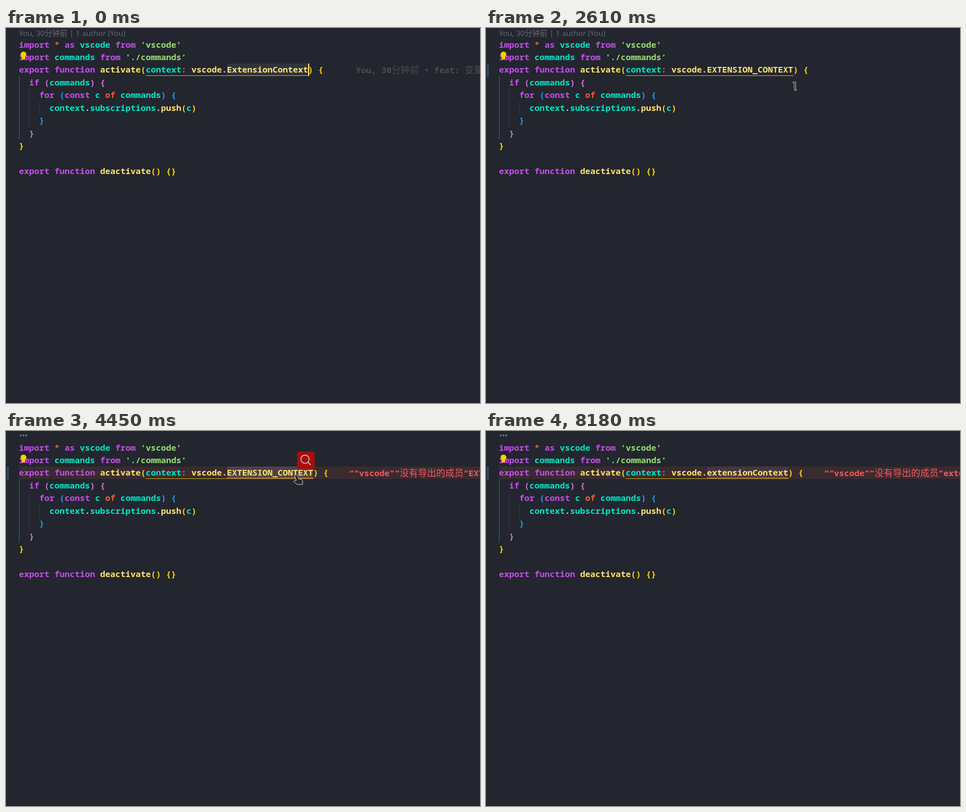
An HTML page with a canvas for the animation above (8260 ms loop, 841 px wide and 665 px high).

```html
<!DOCTYPE html>
<html lang="zh">
<head>
<meta charset="utf-8">
<title>Rename variable</title>
<style>
html, body { margin: 0; height: 100%; overflow: hidden; background: #23262e; }
canvas { display: block; }
</style>
</head>
<body>
<canvas id="stage" width="841" height="665"></canvas>
<script>
const ctx = document.getElementById('stage').getContext('2d');
const LOOP = 8260;
const MONO = 'bold 15px "Noto Sans Mono", "DejaVu Sans Mono", monospace';
const CJK = '"Noto Sans CJK SC", "Noto Sans CJK", sans-serif';
const sans = (size, style = '') => `${style} ${size}px "Open Sans", "Noto Sans", sans-serif`;

const COLORS = {
  k: '#c74ded', v: '#00e8c6', s: '#96e072', f: '#ffe66d', o: '#ee5d43',
  p: '#d5ced9', g: '#ffd700', m: '#da70d6', b: '#179fff', c: '#6f7178'
};

// "~x" switches to the colour x
const codeLines = word => [
  "~kimport ~o* ~kas ~vvscode ~kfrom ~s'vscode'",
  "~kimport ~vcommands ~kfrom ~s'./commands'",
  `~kexport function ~factivate~g(~vcontext~o: ~fvscode~p.~f${word}~g) {`,
  '~k  if ~m(~vcommands~m) {',
  '~k    for ~b(~kconst ~vc ~oof ~vcommands~b) {',
  '~v      context~p.~vsubscriptions~p.~fpush~g(~vc~g)',
  '~b    }',
  '~m  }',
  '~g}',
  '',
  '~kexport function ~fdeactivate~g() {}'
];

// label, shortcut ('>' is a submenu); null is a separator
const MENU = [
  ['常量转驼峰', 'Ctrl+L Ctrl+L'], ['改为驼峰命名', 'Ctrl+N Ctrl+N'],
  ['驼峰转常量', 'Ctrl+U Ctrl+U'], ['Run Code', 'Ctrl+Alt+N'],
  ['转到定义', 'F12'], ['转到类型定义'], ['转到实现', 'Ctrl+F12'],
  ['转到引用', 'Shift+F12'], ['转到源定义'], ['快速查看', '>'], null,
  ['查找所有引用', 'Shift+Alt+F12'], ['查找所有实现'],
  ['显示调用层次结构', 'Shift+Alt+H'], null,
  ['重命名符号', 'F2'], ['更改所有匹配项', 'Ctrl+F2'],
  ['格式化文档', 'Shift+Alt+F'], ['使用...格式化文档'],
  ['格式化选定内容', 'Ctrl+K Ctrl+F'], ['格式化选定内容的方式...'],
  ['重构...', 'Ctrl+Shift+R'], ['源代码操作...'], null,
  ['Commit Changes', '>']
];

// time, x, y
const MOUSE = [
  [460, 690, 465], [1270, 473, 75], [1880, 473, 75], [2150, 548, 103],
  [3290, 548, 103], [3420, 540, 99], [3750, 517, 75], [4600, 515, 78],
  [4920, 606, 82], [5130, 606, 82], [5250, 611, 60], [5850, 690, 390],
  [6990, 690, 390]
];
const HAND = new Path2D('M-3 2Q-3 0 -1 0Q1 0 2 2L4 7L9 8Q11 9 11 12V17H2L-5 12Q-4 9 0 10Z');
const IBEAM = new Path2D('M-3 -7.5H1.5V6H3V7.5H-1V-5H-3Z');

const within = (t, ...spans) => spans.some(([a, b]) => t >= a && t < b);

function rect(x, y, w, h, color) {
  ctx.fillStyle = color;
  ctx.fillRect(x, y, w, h);
}

function rounded(x, y, w, h, r, color) {
  ctx.fillStyle = color;
  ctx.beginPath();
  ctx.roundRect(x, y, w, h, r);
  ctx.fill();
}

function dot(x, y, r, color) {
  ctx.fillStyle = color;
  ctx.beginPath();
  ctx.arc(x, y, r, 0, 7);
  ctx.fill();
}

function line(points, color, width = 1) {
  ctx.strokeStyle = color;
  ctx.lineWidth = width;
  ctx.beginPath();
  points.forEach(([x, y]) => ctx.lineTo(x, y));
  ctx.stroke();
}

// Latin and Chinese runs have their own font; returns the end x
function text(str, x, y, color, font, cjkSize = 16.3) {
  ctx.fillStyle = color;
  for (const run of str.match(/[\u3000-\u9fff]+|[^\u3000-\u9fff]+/g) || []) {
    ctx.font = run[0] >= '\u3000' ? `${cjkSize}px ${CJK}` : font;
    ctx.fillText(run, x, y);
    x += ctx.measureText(run).width;
  }
  return x;
}

function code(str, x, y) {
  for (const part of str.split('~').slice(1))
    x = text(part.slice(1), x, y, COLORS[part[0]], MONO);
}

function mouseAt(t) {
  const i = MOUSE.findIndex(m => m[0] > t);
  if (i < 1) return null;
  const [t0, x0, y0] = MOUSE[i - 1], [t1, x1, y1] = MOUSE[i];
  const u = (t - t0) / (t1 - t0), e = u * u * (3 - 2 * u);
  return [x0 + (x1 - x0) * e, y0 + (y1 - y0) * e];
}

function drawEditor(t) {
  const edited = t >= 2600, error = t >= 3100;
  const word = !edited ? 'ExtensionContext'
    : t < 5450 ? 'EXTENSION_CONTEXT' : 'extensionContext';
  const end = 392 + word.length * 9;

  if (error) rect(23, 63, 818, 22, '#3a2b31');
  if (!edited) rect(392, 63, 145, 22, '#30333e');
  else if (within(t, [3150, 3800], [4200, 5450])) rect(392, 63, end - 392, 22, '#4f414b');
  else if (t >= 5850) rect(392, 63, end - 392, 22, '#45373f');

  rect(23, 85.5, 1, 112, '#55575e');
  rect(41, 108, 1, 68, '#373a42');
  rect(59, 130.5, 1, 22.5, '#373a42');
  codeLines(word).forEach((s, i) => code(s, 23, 34.5 + 22.47 * i));
  rect(248, 84, end - 247, 1, '#c9aa0a');

  if (t < 3010) text('You, 30分钟前 | 1 author (You)', 23, 14, '#6b6d74', sans(13.5), 13.5);
  else for (const x of [26, 31, 36]) dot(x, 8, 1.7, '#74767c');

  if (edited) {
    for (let y = 63; y < 85; y += 2.6) line([[1.5, y + 2.5], [5, y]], '#3c8ba8');
  } else {
    text('You, 30分钟前 • feat: 变量命名转换', 621, 79.5, '#494c54', MONO, 16.3);
  }
  if (error) {
    const wave = [];
    for (let x = 392; x <= end; x++) wave.push([x, 83 + Math.sin(x * 1.25) * 1.3]);
    line(wave, '#e8685c');
    const name = t < 5700 ? 'EXTENSION_CONTEXT' : word;
    text(`“"vscode"”没有导出的成员“${name}”。`, end + 63.5, 79.5, '#f85858', MONO, 16.2);
  }

  // light bulb
  dot(31, 47, 5.2, '#fc0');
  rounded(28, 50, 6, 5.5, 1, '#fc0');

  const caret = within(t, [0, 70], [570, 1070], [2810, 3310], [3810, 4120],
    [5450, 5850], [6260, 6790], [7260, 7860]);
  if (caret) rect(end, 63, 2, 22, '#ffe66d');
}

function drawHover() {
  const TEAL = '#0e9c8a', INK = '#d5d3da', body = sans(15.2);
  rect(392, 85, 449, 258, '#373941');
  code('~ktype ~pvscode.EXTENSION_CONTEXT ~o= ~c/*unresolved*/ ~pany', 401, 107.5);
  for (const y of [85, 117, 252, 342]) rect(392, y, 449, 1, TEAL);
  rect(392, 85, 1, 258, TEAL);

  ctx.save();
  ctx.beginPath();
  ctx.rect(393, 86, 448, 256);
  ctx.clip();
  text('翻译', 401, 140, INK, body);
  rounded(438.5, 125, 166, 19, 3, '#25272e');
  text('EXTENSION_CONTEXT', 445, 139.5, INK, '500 15px "Noto Sans Mono", monospace');
  text(':', 609, 140, INK, body);

  const entry = (y, name, sound, lines) => {
    dot(409, y - 5.5, 2.8, INK);
    const x = text(name, 421.5, y, '#3b8ff5', body);
    text(':', text(` /${sound}/`, x, y, INK, sans(15.2, 'italic')), y, INK, body);
    lines.forEach((s, i) => text(s, 421.5, y + 22.6 * (i + 1), INK, body));
  };
  entry(171.5, 'extension', "ik'stenʃən", ['n. 延长, 扩充, 范围, 扩展名', 'a. 伸缩的', '[计] 扩展名, 扩充名']);
  entry(274.5, 'context', "'kɒntekst", ['n. 上下文, 背景, 来龙去脉', 'n. 上下文', '[计] 上下文']);
  ctx.restore();
}

function drawMenu(left, mouse) {
  ctx.save();
  ctx.shadowColor = 'rgba(0,0,0,.45)';
  ctx.shadowBlur = 8;
  rounded(left, 39, 291, 640, 4, '#2b303b');
  ctx.restore();
  let y = 57;
  for (const item of MENU) {
    if (!item) {
      rect(left, y - 9, 291, 1, '#50545e');
      y += 11.3;
      continue;
    }
    const hot = mouse[0] > left - 4 && Math.abs(mouse[1] - y) < 13.2;
    const color = hot ? '#00e8c6' : '#eceef0';
    if (hot) rect(left + 4, y - 13, 283, 26, '#252a34');
    const [label, key] = item;
    text(label, left + 30.5, y + 4.8, color, sans(12.8), 13.4);
    if (key === '>') {
      line([[left + 268, y - 5], [left + 273, y], [left + 268, y + 5]], color, 1.2);
    } else if (key) {
      ctx.textAlign = 'right';
      text(key, left + 261, y + 4.8, color, sans(13.3));
      ctx.textAlign = 'left';
    }
    y += 26.58;
  }
}

function drawSearch(x, y) {
  rounded(x, y, 31, 31, 4, '#a80d10');
  ctx.strokeStyle = '#d8d0d0';
  ctx.lineWidth = 1.4;
  ctx.beginPath();
  ctx.arc(x + 14, y + 13.5, 7.3, 0, 7);
  ctx.stroke();
  line([[x + 19.2, y + 18.8], [x + 24, y + 23.5]], '#d8d0d0', 1.6);
}

function drawMouse([x, y], hand) {
  ctx.save();
  ctx.translate(x, y);
  ctx.lineWidth = 1;
  ctx.fillStyle = '#23262e';
  ctx.strokeStyle = hand ? '#d0d0d0' : '#b0b0ae';
  const shape = hand ? HAND : IBEAM;
  ctx.fill(shape);
  ctx.stroke(shape);
  ctx.restore();
}

function draw(t) {
  const mouse = mouseAt(t);
  rect(0, 0, 841, 665, '#23262e');
  drawEditor(t);
  if (within(t, [3850, 4120])) drawHover();
  const first = within(t, [1610, 2480]), second = within(t, [4540, 5130]);
  if (first) drawMenu(474, mouse);
  if (second) drawMenu(517, mouse);
  if (within(t, [1400, 2290])) drawSearch(473.5, 35.5);
  if (within(t, [4300, 4920])) drawSearch(516.5, 36.5);
  if (mouse) drawMouse(mouse, first || second || within(t, [4300, 4540]));
  rect(0, 664, 841, 1, '#1c1e28');
}

function frame() {
  draw(performance.now() % LOOP);
  requestAnimationFrame(frame);
}
frame();
</script>
</body>
</html>
```
